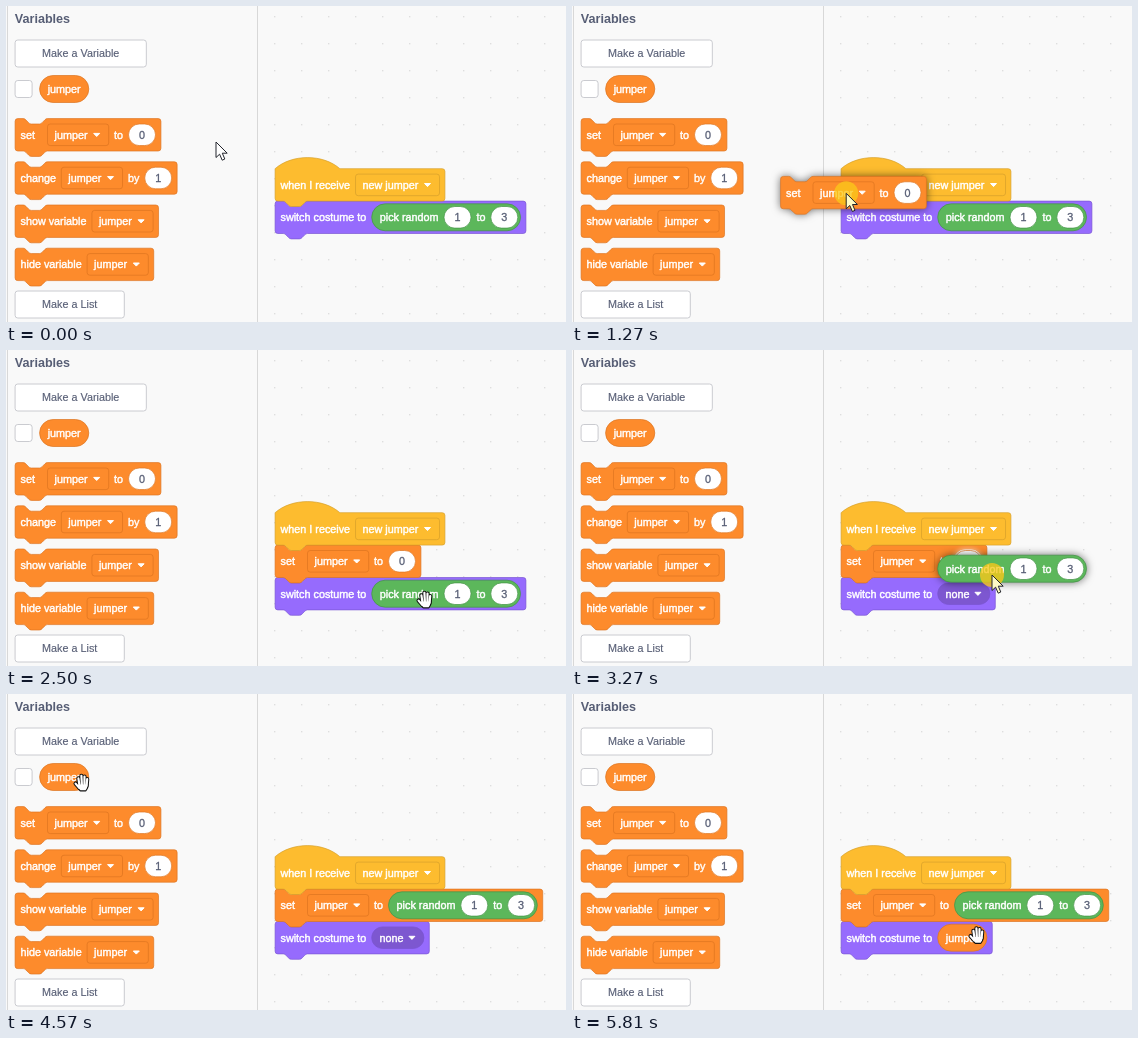
An HTML page with a canvas that plays this animation: 560x316 px, repeating every 6360 ms.

```html
<!DOCTYPE html>
<html lang="en">
<head>
<meta charset="utf-8">
<title>Block editor</title>
<style>
  html, body { margin: 0; width: 100%; height: 100%; overflow: hidden; background: #f9f9f9; }
  canvas { display: block; }
</style>
</head>
<body>
<canvas id="stage" width="560" height="316"></canvas>
<script>
const ctx = document.getElementById('stage').getContext('2d');
const LOOP = 6360, STEP = 77, FIRST = 103;
const SCALE = 0.675, GAP = 5.4, ROW = 32.4;
const FONT = '"Liberation Sans", Arial, sans-serif';
const INK = '#575e75';

// [fill, outline]
const ORANGE = ['#fd8b2c', '#dd7420'];
const YELLOW = ['#fdbc2f', '#d6a02c'];
const PURPLE = ['#966bfd', '#7a55d2'];
const GREEN = ['#5cb75b', '#439245'];

// Motion tracks: [step, x, y]
const POINTER = [
  [-1, 210, 136], [0, 202, 135.5], [1, 174, 134], [2, 138, 132], [3, 106, 130.5], [4, 85, 129.5], [5, 78, 129],
  [7, 78, 129], [8, 112, 132], [11, 187, 140.5], [16, 296, 199], [19, 319, 213], [21, 328, 215],
  [25, 378, 253], [31, 420, 250], [35, 420, 250], [36, 416, 248], [38, 405, 244], [39, 405, 244],
  [40, 409, 238], [41, 420, 225], [42, 430, 219], [43, 436, 218], [46, 436, 218],
  [48, 390, 200], [51, 230, 145], [53, 150, 118], [55, 100, 102], [58, 77, 89], [59, 66, 83], [62, 66, 83],
  [63, 90, 88], [66, 205, 140], [69, 350, 220], [71, 402, 240], [72, 406, 241.5]
];
const SET_DRAG = [[7, 9.1, 112.6], [8, 46, 115], [11, 115, 124], [16, 232, 182], [19, 259.7, 195.7], [20, 262, 196]];

const label = s => ({ type: 'label', s });
const menu = s => ({ type: 'menu', s });
const slot = s => ({ type: 'slot', s });
const num = (s, glow) => ({ type: 'num', s, glow });
const reporter = (color, items) => ({ type: 'reporter', color, items });

const jumper = reporter(ORANGE, [label('jumper')]);
const pick = reporter(GREEN, [label('pick random'), num('1'), label('to'), num('3')]);
const setItems = value => [label('set'), menu('jumper'), label('to'), value];

function track(path, k) {
  let i = path.findIndex(p => p[0] > k);
  if (i < 0) i = path.length;
  const a = path[Math.max(i - 1, 0)], b = path[Math.min(i, path.length - 1)];
  const f = b[0] > a[0] ? (k - a[0]) / (b[0] - a[0]) : 0;
  return [a[1] + (b[1] - a[1]) * f, a[2] + (b[2] - a[2]) * f];
}

function setFont(size = 10.8, weight = '') {
  ctx.font = `${weight} ${size}px ${FONT}`;
}

function text(s, x, cy, color = '#fff', heavy = 0.45) {
  setFont();
  ctx.fillStyle = ctx.strokeStyle = color;
  ctx.lineWidth = heavy;
  ctx.lineJoin = 'round';
  if (heavy) ctx.strokeText(s, x, cy + 3.9);
  ctx.fillText(s, x, cy + 3.9);
}

function textWidth(s) {
  setFont();
  return ctx.measureText(s).width;
}

function box(x, y, w, h, r, fill, stroke, line = 0.7) {
  ctx.beginPath();
  ctx.roundRect(x, y, w, h, r);
  ctx.fillStyle = fill;
  ctx.fill();
  ctx.shadowColor = 'transparent';
  ctx.strokeStyle = stroke;
  ctx.lineWidth = line;
  ctx.stroke();
}

function castShadow() {
  ctx.shadowColor = 'rgba(0,0,0,.6)';
  ctx.shadowBlur = 8;
}

function itemWidth(it) {
  if (it.type === 'num') return 27;
  if (it.type === 'reporter') return layout(it.items, 8.1).width;
  return textWidth(it.s) + (it.type === 'label' ? 0 : 28.2);
}

function layout(items, pad) {
  let x = pad;
  const xs = items.map(it => {
    if (it.type === 'menu') x = Math.max(x, 48 * SCALE);
    const at = x;
    x += itemWidth(it) + GAP;
    return at;
  });
  const inset = pad > GAP && items.at(-1).type === 'num' ? 2.7 : pad;
  return { xs, width: x - GAP + inset };
}

function arrowDown(x, cy) {
  ctx.beginPath();
  ctx.moveTo(x - 3, cy - 1.4);
  ctx.lineTo(x + 3, cy - 1.4);
  ctx.lineTo(x, cy + 1.7);
  ctx.closePath();
  ctx.fillStyle = ctx.strokeStyle = '#fff';
  ctx.lineWidth = 1;
  ctx.fill();
  ctx.stroke();
}

function glowRing(x, y, w, h) {
  ctx.save();
  ctx.shadowColor = '#fff';
  ctx.shadowBlur = 5;
  ctx.beginPath();
  ctx.roundRect(x, y, w, h, h / 2);
  ctx.strokeStyle = '#fff';
  ctx.lineWidth = 2;
  ctx.stroke();
  ctx.restore();
}

function drawItem(it, x, cy, color) {
  const w = itemWidth(it);
  if (it.type === 'label') return text(it.s, x, cy);
  if (it.type === 'reporter') return drawReporter(it, x, cy - 13.5);
  if (it.glow) glowRing(x, cy - 10.8, w, 21.6);
  if (it.type === 'num') {
    box(x, cy - 10.8, w, 21.6, 10.8, '#fff', color[1]);
    return text(it.s, x + w / 2 - textWidth(it.s) / 2, cy, INK, 0.3);
  }
  const round = it.type === 'slot';
  box(x, cy - 10.8, w, 21.6, round ? 10.8 : 2.7, round ? '#7d57d0' : color[0], color[1]);
  text(it.s, x + (round ? 7.8 : 7), cy);
  arrowDown(x + w - 12, cy);
}

function drawReporter(rep, x, y, lifted) {
  const { xs, width } = layout(rep.items, 8.1);
  ctx.save();
  if (lifted) castShadow();
  box(x, y, width, 27, 13.5, ...rep.color);
  ctx.restore();
  rep.items.forEach((it, i) => drawItem(it, x + xs[i], y + 13.5, rep.color));
}

function blockPath(width, hat) {
  const w = width / SCALE;
  const top = hat
    ? 'M0 4V0c25-22 71-22 96 0'
    : 'M0 4A4 4 0 0 1 4 0H12c2 0 3 1 4 2l4 4c1 1 2 2 4 2h12c2 0 3-1 4-2l4-4c1-1 2-2 4-2';
  return new Path2D(`${top}H${w - 4}a4 4 0 0 1 4 4v40a4 4 0 0 1-4 4H48c-2 0-3 1-4 2l-4 4` +
    'c-1 1-2 2-4 2h-12c-2 0-3-1-4-2l-4-4c-1-1-2-2-4-2H4a4 4 0 0 1-4-4z');
}

function drawBlock(x, y, color, items, { hat, lifted, ghost } = {}) {
  const { xs, width } = layout(items, GAP);
  const path = blockPath(width, hat);
  ctx.save();
  ctx.translate(x, y);
  ctx.scale(SCALE, SCALE);
  if (lifted) castShadow();
  ctx.fillStyle = ghost ? 'rgba(0,0,0,.22)' : color[0];
  ctx.fill(path);
  ctx.shadowColor = 'transparent';
  ctx.strokeStyle = color[1];
  ctx.lineWidth = 1;
  if (!ghost) ctx.stroke(path);
  ctx.restore();
  if (!ghost) items.forEach((it, i) => drawItem(it, x + xs[i], y + ROW / 2, color));
}

function button(s, y) {
  const w = textWidth(s) + 54;
  box(9.1, y, w, 27, 2.7, '#fff', '#c4c6cb', 0.9);
  text(s, 36.1, y + 13.5, INK, 0.15);
}

function drawBackground() {
  ctx.fillStyle = '#f9f9f9';
  ctx.fillRect(0, 0, 560, 316);
  ctx.fillStyle = '#dedede';
  for (let x = 268; x < 560; x += 27)
    for (let y = 10; y < 316; y += 27) ctx.fillRect(x, y, 1.35, 1.35);
  ctx.fillStyle = '#d8d8d8';
  ctx.fillRect(1, 0, 1, 316);
  ctx.fillRect(251, 0, 1, 316);
}

function drawPalette() {
  setFont(12.6, 'bold');
  ctx.fillStyle = INK;
  ctx.fillText('Variables', 8.8, 17);
  button('Make a Variable', 34);
  box(9.1, 74.5, 17, 17, 2.7, '#fff', '#c4c6cb', 0.9);
  drawReporter(jumper, 33.6, 69.5);
  [
    setItems(num('0')),
    [label('change'), menu('jumper'), label('by'), num('1')],
    [label('show variable'), menu('jumper')],
    [label('hide variable'), menu('jumper')]
  ].forEach((items, i) => drawBlock(9.1, 112.6 + 43.2 * i, ORANGE, items));
  button('Make a List', 285);
}

function drawScript(k) {
  const x = 269.1, y = 162.7;
  const value = k < 47 ? num('0', k >= 41) : pick;
  const costume = k < 36 ? pick : k < 74 ? { ...slot('none'), glow: k >= 70 } : jumper;
  drawBlock(x, y + ROW * (k < 17 ? 1 : 2), PURPLE, [label('switch costume to'), costume]);
  if (k >= 17) drawBlock(x, y + ROW, ORANGE, setItems(value), { ghost: k < 21 });
  drawBlock(x, y, YELLOW, [label('when I receive'), menu('new jumper')], { hat: true });
}

function drawDragged(k, px, py) {
  if (k >= 8 && k < 21) drawBlock(...track(SET_DRAG, k), ORANGE, setItems(num('0')), { lifted: true });
  if (k >= 36 && k < 47) drawReporter(pick, px - 54.3, py - 19.8, true);
  if (k >= 63 && k < 74) drawReporter(jumper, px - 33.5, py - 14, true);
}

function drawArrow(fill) {
  const p = new Path2D('M0 0V15.5L3.6 12.2 6.2 18.2 8.8 17 6.3 11.2H11.2Z');
  ctx.fillStyle = fill;
  ctx.strokeStyle = '#22242c';
  ctx.lineWidth = 1;
  ctx.lineJoin = 'miter';
  ctx.fill(p);
  ctx.stroke(p);
}

function drawHand(fill) {
  const fingers = new Path2D('M-4.6-4.6L-3.6 2M-1.6-7.2L-1.1 2M1.5-6.4L1.4 2M4.2-4L3.6 3M-7.4.6L-3.6 5');
  const palm = new Path2D('M-4.6 1.5H4.4L4 5 2.6 7.3H-2.6L-4.6 4.6Z');
  ctx.lineCap = ctx.lineJoin = 'round';
  ctx.strokeStyle = '#111';
  ctx.lineWidth = 4.2;
  ctx.stroke(fingers);
  ctx.lineWidth = 2.2;
  ctx.stroke(palm);
  ctx.strokeStyle = ctx.fillStyle = fill;
  ctx.stroke(fingers);
  ctx.fill(palm);
}

function drawPointer(k, x, y) {
  const pressed = (k >= 8 && k < 21) || (k >= 36 && k < 47) || (k >= 61 && k < 74);
  const hand = (k >= 3 && k < 8) || (k >= 17 && k < 36) || (k >= 57 && k < 63) || k >= 74;
  ctx.save();
  ctx.translate(x, y);
  if (pressed) {
    ctx.beginPath();
    ctx.arc(0, 0, 12, 0, 7);
    ctx.fillStyle = 'rgba(250,200,25,.78)';
    ctx.fill();
  }
  (hand ? drawHand : drawArrow)(pressed ? '#fffbc4' : '#fff');
  ctx.restore();
}

function draw(t) {
  const k = Math.max(-1, Math.floor((t - FIRST) / STEP));
  const [x, y] = track(POINTER, k);
  drawBackground();
  drawPalette();
  drawScript(k);
  drawDragged(k, x, y);
  drawPointer(k, x, y);
}

let start;
function tick(now) {
  start ??= now;
  draw((now - start) % LOOP);
  requestAnimationFrame(tick);
}
draw(0);
requestAnimationFrame(tick);
</script>
</body>
</html>
```
